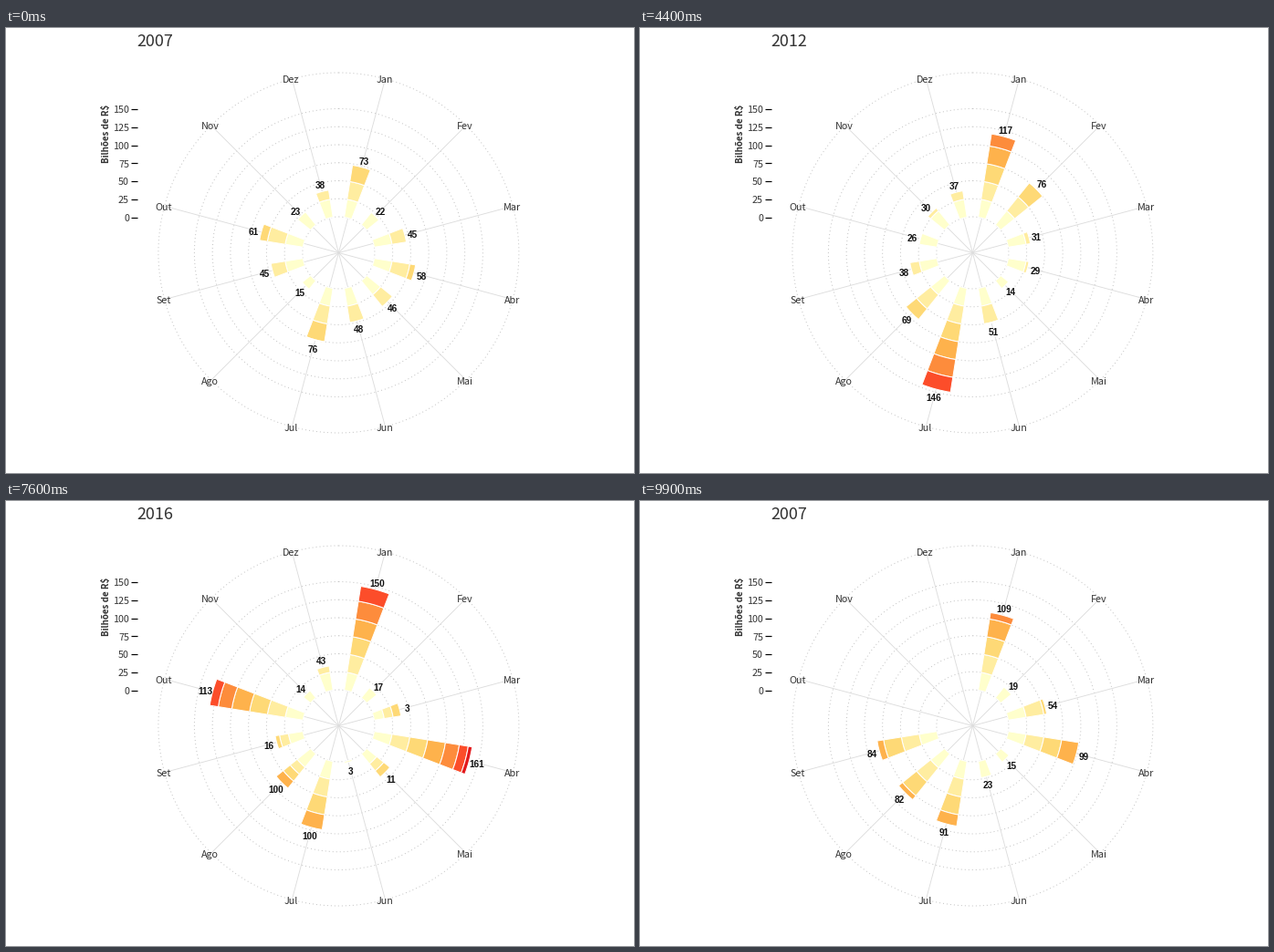
A matplotlib script for the animation above (10 s loop, 688 by 488 pixels).

```python
import numpy as np
import matplotlib.pyplot as plt
from matplotlib.animation import FuncAnimation
from matplotlib.patches import Circle, Rectangle, Wedge

W, H = 688, 488
CX, CY, R = 364.4, 246.5, 197.5
R0, STEP, SLICES = R / 5, 25, 7
PX = R / 10 / STEP
SANS, INK = "Noto Sans CJK JP", "#333333"
MONTHS = "Jan Fev Mar Abr Mai Jun Jul Ago Set Out Nov Dez".split()
COLORS = [plt.get_cmap("YlOrRd")(j / 8) for j in range(SLICES)]
FIRST, LAST, LAST_MONTHS = 2007, 2018, 9

# Billions per month in the key years; other years lie on a line between them
KEYS = {
    2007: [73, 22, 45, 58, 46, 48, 76, 15, 45, 61, 23, 38],
    2009: [94, 10, 28, 39, 39, 34, 50, 26, 47, 51, 27, 42],
    2012: [117, 76, 31, 29, 14, 51, 146, 69, 38, 26, 30, 37],
    2014: [135, 21, 63, 93, 8, 2, 83, 71, 58, 84, 10, 7],
    2016: [150, 17, 3, 161, 11, 3, 100, 100, 16, 113, 14, 43],
    2018: [109, 19, 54, 99, 15, 23, 91, 82, 84, 90, 19, 3],
}
# Turning points where a month swings away from that line
TURNS = {
    2008: dict(Abr=73, Mai=15, Jul=93, Out=28),
    2015: dict(Mar=72, Abr=114, Mai=72, Ago=23, Set=62, Out=149),
    2017: dict(Jan=152, Abr=75, Mai=65, Ago=18, Out=90, Dez=3),
}
FADE, RESTART, TICKS = 98, 99, 100

fig = plt.figure(figsize=(W / 72, H / 72), dpi=72, facecolor="white")
ax = fig.add_axes([0, 0, 1, 1])
ax.set(xlim=(0, W), ylim=(H, 0))
ax.axis("off")


def polar(i, r):
    a = np.radians(15 + 30 * i)
    return CX + r * np.sin(a), CY - r * np.cos(a)


def text(x, y, s, size, ha="center", font=SANS, **kw):
    """Place text with its digits centred vertically on y."""
    return ax.text(x, y + 0.365 * size, s, fontsize=size, ha=ha,
                   va="baseline", family=font, **kw)


def total(i, year):
    """Billions for month i in a year."""
    line = np.interp(year, list(KEYS), [row[i] for row in KEYS.values()])
    return round(TURNS.get(year, {}).get(MONTHS[i], line))


def split(value):
    """Cut a value into stacked slices of one step each."""
    return np.clip(value - STEP * np.arange(SLICES), 0, STEP)


def settled(n):
    """Tick at which year n stands still; the tick before is halfway."""
    return max(0, min(9 * n - 1, 8 * n + 5))


# Grid
for n in [0, 1, 2, 3, 4, 5, 6, 8]:
    ax.add_patch(Circle((CX, CY), R0 + n * STEP * PX, fill=False, ec="#c4c4c4",
                        lw=1, ls=(0, (1, 3)), capstyle="butt", zorder=1))
for i, name in enumerate(MONTHS):
    x, y = polar(i, R)
    ax.plot([CX, x], [CY, y], color="#dddddd", lw=0.9, zorder=1)
    text(x - 1, y + 0.7, name, 10.75, color=INK, zorder=5)

# Scale
for v in range(0, 151, STEP):
    y = CY - R0 - v * PX
    ax.plot([137, 144], [y + 0.5] * 2, color="black", lw=1.2,
            solid_capstyle="butt")
    text(135, y + 1, str(v), 10.75, ha="right", color=INK)
ax.text(110.3, 115.5, "Bilhões de R$", fontsize=9.8, family=SANS,
        weight="bold", rotation=90, ha="center", va="center", color=INK)
title = text(143.3, 13.5, "", 18, ha="left", color=INK)

# Bars and their values
bars, labels = [], []
for i in range(12):
    mid = 30 * i - 75
    row = [Wedge((CX, CY), R0, mid - 6, mid + 6, fc=c, ec="white", lw=1,
                 zorder=3) for c in COLORS]
    for w in row:
        ax.add_patch(w)
    bars.append(row)
    labels.append(text(0, 0, "", 10, font="Liberation Sans", weight="bold",
                       color="#111111", zorder=6))
veil = ax.add_patch(Rectangle((0, 0), W, H, fc="white", alpha=0.6, zorder=9))


def draw_month(i, year, half):
    value = total(i, year)
    slices = split(value)
    if half:
        slices = (slices + split(total(i, year - 1))) / 2
    # The last year ends early: its missing months leave once it has settled
    shown = half or year < LAST or i < LAST_MONTHS
    r = R0
    for w, d in zip(bars[i], slices * PX):
        w.set_visible(shown and d > 0)
        r += d
        w.set_radius(r)
        w.set_width(d)
    x, y = polar(i, r + 8.4)
    labels[i].set_visible(shown)
    labels[i].set_text(str(value))
    labels[i].set_position((x, y + 5))


def update(k):
    n = max(j for j in range(LAST - FIRST + 1) if settled(j) - 1 <= k)
    half = k == settled(n) - 1
    title.set_text(str(FIRST if k == RESTART else FIRST + n))
    veil.set_visible(k == FADE)
    for i in range(12):
        draw_month(i, FIRST + n, half)
    return []


anim = FuncAnimation(fig, update, frames=TICKS, interval=100,
                     repeat=True, repeat_delay=0)
plt.show()
```
